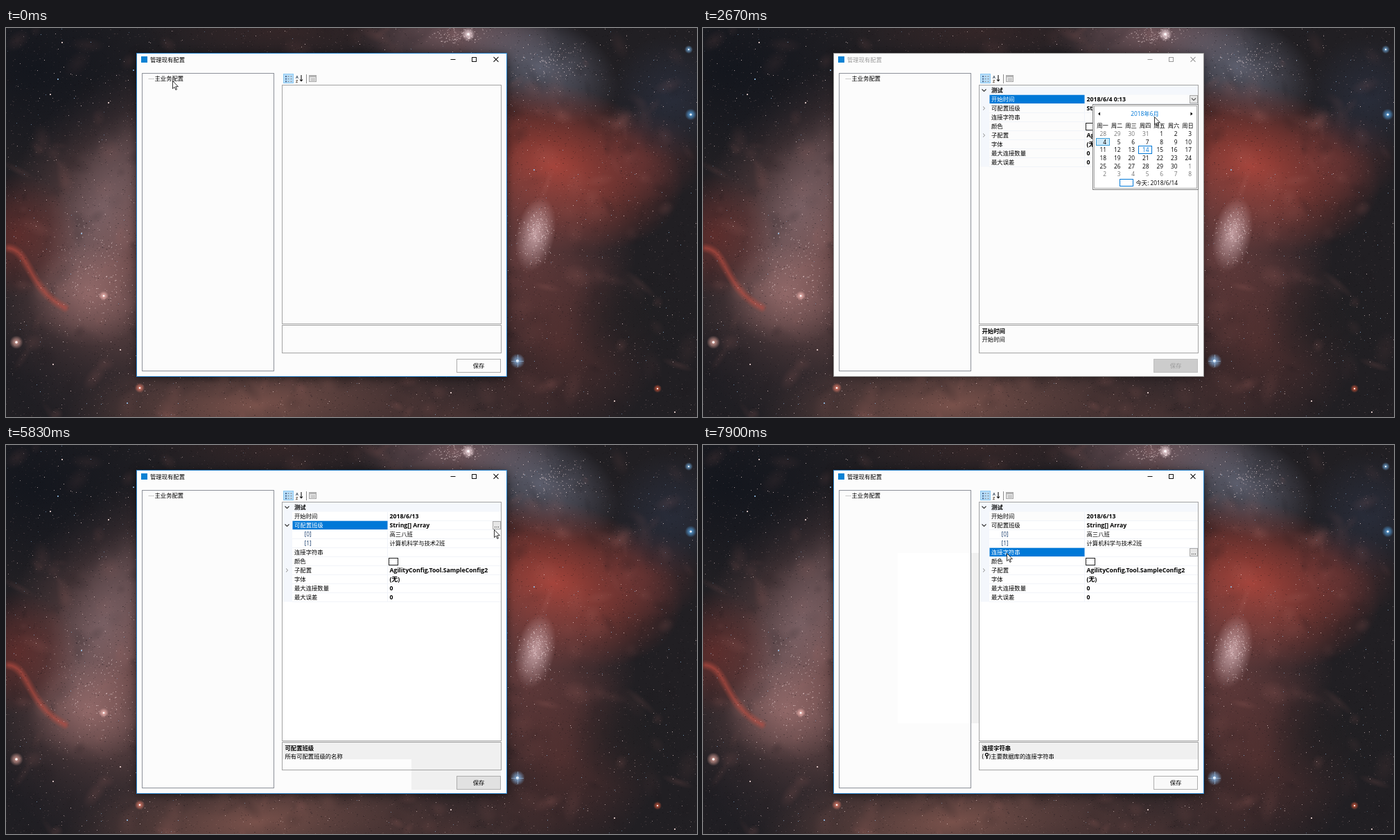
These frames come from a looping animation (997x562 px, 7990 ms). An HTML page with a canvas:

```html
<!DOCTYPE html>
<html>
<head>
<meta charset="utf-8">
<title>管理现有配置</title>
<style>
html, body { margin: 0; width: 100%; height: 100%; overflow: hidden; background: #1c1b20; }
canvas, svg { position: absolute; left: 0; top: 0; width: 997px; height: 562px; }
text { font: 8.33px "Open Sans", "Noto Sans CJK SC", "Noto Sans CJK", sans-serif; fill: #000; white-space: pre; }
.b { font-weight: 700; }
.v { font-size: 8.7px; font-weight: 700; }
.w { fill: #fff; }
.g { fill: #767676; }
.off { fill: #9b9b9b; }
.blue { fill: #0078d7; }
.navy { fill: #1c3f6e; }
.mid { text-anchor: middle; }
.end { text-anchor: end; }
.shadow { filter: drop-shadow(0 2px 6px rgba(0,0,0,.5)); }
.soft { filter: drop-shadow(0 1px 5px rgba(0,0,0,.3)); }
path { fill: none; }
</style>
</head>
<body>
<canvas id="sky" width="997" height="562"></canvas>
<svg id="ui" viewBox="0 0 997 562"></svg>
<script>
const LOOP = 7990;
// Moments at which the state of the interface changes, in ms
const LOAD = 270, PICK = 1140, DATE = 1860, CAL = 2670, SET = 3490,
      OPEN = 4570, EDIT = 6010, DONE = 6970, LINK = 7810;

/* ---------- nebula ---------- */
function paintSky() {
  const c = document.getElementById('sky').getContext('2d');
  let seed = 77;
  const rnd = () => (seed = (seed * 16807) % 2147483647) / 2147483647;
  c.fillStyle = '#211f23';
  c.fillRect(0, 0, 997, 562);

  const blob = (x, y, rx, ry, rgb, a, rot = 0) => {
    c.save();
    c.translate(x, y);
    c.rotate(rot);
    c.scale(rx, ry);
    const g = c.createRadialGradient(0, 0, 0, 0, 0, 1);
    g.addColorStop(0, `rgba(${rgb},${a})`);
    g.addColorStop(.5, `rgba(${rgb},${a * .55})`);
    g.addColorStop(1, `rgba(${rgb},0)`);
    c.fillStyle = g;
    c.fillRect(-1, -1, 2, 2);
    c.restore();
  };
  blob(170, 310, 190, 270, '150,100,98', .72, .35);
  blob(140, 260, 70, 150, '150,128,135', .45, .4);
  blob(120, 385, 90, 75, '195,140,138', .5);
  blob(15, 300, 90, 90, '120,48,44', .6);
  blob(360, 545, 280, 85, '150,98,88', .75, -.08);
  blob(640, 560, 190, 90, '110,70,66', .5);
  blob(650, 10, 150, 55, '150,112,118', .7);
  blob(400, 5, 200, 45, '80,48,46', .4);
  blob(770, 55, 120, 75, '125,128,148', .65, .4);
  blob(790, 200, 190, 120, '190,72,60', .85, .25);
  blob(740, 320, 170, 160, '145,80,78', .6);
  blob(764, 298, 28, 55, '235,200,205', .7, .2);
  blob(800, 455, 140, 150, '120,62,58', .5);
  blob(915, 190, 90, 70, '135,62,60', .45);
  blob(960, 100, 90, 90, '55,70,100', .35);
  blob(40, 60, 200, 140, '16,20,28', .8);
  blob(910, 420, 100, 80, '32,31,34', .8);
  blob(30, 510, 160, 90, '30,29,35', .6);

  for (let i = 0; i < 420; i++)
    blob(rnd() * 997, rnd() * 562, 6 + rnd() * 24, 5 + rnd() * 14,
      rnd() < .55 ? '24,20,24' : '178,110,104', .06 + rnd() * .12, rnd() * 3);

  c.lineCap = 'round';
  for (let i = 0; i < 5; i++) {
    c.strokeStyle = `rgba(190,80,68,${.24 - i * .035})`;
    c.lineWidth = 2 + i * 3;
    c.beginPath();
    c.moveTo(4, 318);
    c.bezierCurveTo(35, 322, 30, 375, 85, 404);
    c.stroke();
  }

  // Grain, then stars
  for (let i = 0; i < 15000; i++) {
    c.fillStyle = rnd() < .55 ? `rgba(15,12,16,${.1 + rnd() * .25})` : `rgba(225,180,176,${rnd() * .2})`;
    c.fillRect(rnd() * 997 | 0, rnd() * 562 | 0, 1 + rnd() * 1.4 | 0, 1);
  }
  for (let i = 0; i < 1000; i++) {
    const s = rnd();
    c.fillStyle = `rgba(${rnd() < .3 ? '150,195,235' : '250,225,222'},${.25 + s * .55})`;
    const d = s > .97 ? 2 : 1;
    c.fillRect(rnd() * 997 | 0, rnd() * 562 | 0, d, d);
  }
  const cluster = (x, y, w, h, n) => {
    for (let i = 0; i < n; i++) {
      c.fillStyle = `rgba(255,235,235,${.3 + rnd() * .6})`;
      c.fillRect(x + (rnd() + rnd() - 1) * w, y + (rnd() + rnd() - 1) * h, 1, 1);
    }
  };
  cluster(655, 11, 50, 14, 130);
  cluster(764, 300, 28, 48, 170);
  cluster(125, 350, 70, 110, 160);
  cluster(790, 50, 60, 32, 120);

  const star = (x, y, r, rgb) => {
    blob(x, y, r * 2.4, r * 2.4, rgb, .9);
    c.fillStyle = '#fff';
    c.beginPath();
    c.arc(x, y, r * .45, 0, 7);
    c.fill();
  };
  star(738, 481, 4.5, '140,190,240');
  star(988, 125, 3.5, '90,170,235');
  star(940, 521, 2.5, '220,90,60');
  star(15, 454, 4, '230,170,160');
  star(141, 387, 3, '250,190,185');
  star(667, 9, 4, '255,230,235');
  star(985, 31, 2.5, '120,180,230');
  star(193, 520, 3, '240,130,110');
  c.fillStyle = 'rgba(170,205,240,.7)';
  c.fillRect(729, 481, 18, .7);
  c.fillRect(738, 472, .7, 18);
}

/* ---------- svg helpers ---------- */
const on = (when, body) => `<g data-on="${when}">${body}</g>`;
const txt = (x, cy, s, cls = '') => `<text x="${x}" y="${cy + 3.2}" class="${cls}">${s}</text>`;
const box = (x, y, w, h, fill, stroke, cls = '') => stroke
  ? `<rect x="${x + .5}" y="${y + .5}" width="${w - 1}" height="${h - 1}" fill="${fill}" stroke="${stroke}" class="${cls}"/>`
  : `<rect x="${x}" y="${y}" width="${w}" height="${h}" fill="${fill}" class="${cls}"/>`;
const line = (d, color = '#000', w = 1) => `<path d="${d}" stroke="${color}" stroke-width="${w}"/>`;
const down = (x, y, c = '#333') => line(`M${x - 3} ${y - 1.5}l3 3 3-3`, c, 1.1);
const up = (x, y, c) => line(`M${x - 2.5} ${y + 1}l2.5-2.5 2.5 2.5`, c);
const right = (x, y, c = '#8a8a8a') => line(`M${x - 1.5} ${y - 2.5}l2.7 2.5-2.7 2.5`, c);
const left = (x, y, c) => line(`M${x + 1.5} ${y - 2.5}l-2.7 2.5 2.7 2.5`, c);
const cross = (x, y, c) => line(`M${x - 3.5} ${y - 3.5}l7 7m0-7l-7 7`, c, 1.1);
const button = (x, y, w, h, s, fill, edge, cls = '') =>
  box(x, y, w, h, fill, edge) + txt(x + w / 2, y + h / 2, s, 'mid ' + cls);

/* ---------- window ---------- */
const TREE = [197, 66, 189, 429], GRID = [399, 83, 315, 344];

// Freshly repainted area: grey face, white inside the tree and the grid
function patch(x, y, w, h) {
  const inner = ([a, b, c, d]) => {
    const l = Math.max(x, a), t = Math.max(y, b);
    const r = Math.min(x + w, a + c), e = Math.min(y + h, b + d);
    return r > l && e > t ? box(l, t, r - l, e - t, '#fff') : '';
  };
  return box(x, y, w, h, '#f0f0f0') + inner(TREE) + inner(GRID);
}

const caption = (c, edge, cls, shadow) =>
  box(188, 36, 535, 468, '#fcfcfc', edge, shadow) +
  txt(208, 45.5, '管理现有配置', cls) +
  line('M641.5 45.5h7', c) + box(672, 42, 7, 7, 'none', c) + cross(707, 45.3, c);

function frameLayer() {
  return on(`0-${CAL} ${SET}-${EDIT} ${DONE}-${LOOP}`, caption('#111', '#2a86cf', '', 'shadow')) +
    on(`${CAL}-${SET} ${EDIT}-${DONE}`, caption('#999', '#8f8f8f', 'off', 'soft')) +
    box(195, 41, 9, 9, '#0a82d4') +
    on(`${LOAD}-${CAL}`, patch(213, 66, 501, 432)) +
    on(`${SET}-${EDIT}`, patch(585, 180, 129, 318)) +
    on(`${OPEN}-${EDIT}`, patch(399, 96, 315, 358)) +
    on(`${DONE}-${LOOP}`, patch(281, 156, 117, 246)) +
    on(`${LINK}-${LOOP}`, patch(399, 109, 315, 345)) +
    box(196, 65, 191, 431, 'none', '#8d9199') +
    box(398, 82, 317, 346, 'none', '#a3a3a3') +
    box(398, 429, 317, 41, 'none', '#a3a3a3') +
    `<path d="M206 73.5h7" stroke="#999" stroke-dasharray="1 1"/>` +
    txt(214.5, 73, '主业务配置') +
    on(`${LOAD}-${PICK}`, box(213, 66, 44, 14, '#0078d7') + txt(214.5, 73, '主业务配置', 'w'));
}

function toolbar() {
  let dots = '';
  for (let i = 0; i < 3; i++)
    dots += box(403, 69 + i * 3.6, 2, 2, '#4a6a94') + box(406.5, 69.5 + i * 3.6, 2, 1, '#777') + box(410.5, 69.5 + i * 3.6, 2, 1, '#777');
  return box(400, 66, 15, 14, '#b9dffa', '#8cc8f2') + dots +
    '<text x="418" y="73" style="font-size:5.5px;font-weight:700;fill:#345">A</text>' +
    '<text x="418" y="78.5" style="font-size:5.5px;font-weight:700;fill:#543">Z</text>' +
    line('M426 68v8.5m-2-2l2 2.2 2-2.2', '#111', 1.1) + line('M433.5 67v13', '#8c8c8c') +
    box(437, 68, 11, 10, '#e2e2e2', '#a8a8a8') + box(438, 69, 9, 2, '#b5b5b5') +
    box(440, 73, 6, 1, '#b5b5b5') + box(440, 75, 6, 1, '#b5b5b5');
}

function rows(list) {
  const last = 90 + list.length * 13 + 6.5;
  let s = box(399, 83, 14, last - 83, '#f4f7fc') + box(413, 83, 301, 13.5, '#f4f7fc') +
    down(405.5, 90) + txt(416, 90, '测试', 'b');
  list.forEach(([name, value, mark], i) => {
    const y = 103 + i * 13, sub = name[0] == '[';
    s += line(`M413 ${y + 6.5}h301`, '#f1f4f9') + txt(sub ? 430.5 : 416, y, name, sub ? 'navy' : '') +
      txt(553.5, y, value, sub ? '' : 'v');
    if (mark == '>') s += right(405.5, y);
    if (mark == 'v') s += down(405.5, y);
    if (mark == '#') s += box(552, y - 5, 14, 11, '#fff', '#222');
  });
  return s + line(`M550.5 97V${last}`, '#f1f4f9');
}

const selected = (y, name, list) =>
  box(413.5, y - 6.3, 137, 12.3, '#0078d7') + txt(416, y, name, 'w') +
  box(702, y - 6, 12, 12, '#e6e6e6', '#a9a9a9') +
  (list ? down(708, y, '#555') : [705, 707.5, 710].map(x => box(x, y + 2, 1, 1, '#222')).join(''));

const about = (name, text) => txt(402.5, 437.5, name, 'b') + txt(402.5, 450, text);

function gridLayer() {
  const span = '可配置班级', type = 'String[] Array';
  const tail = [['连接字符串', ''], ['颜色', '', '#'], ['子配置', 'AgilityConfig.Tool.SampleConfig2', '>'],
    ['字体', '(无)'], ['最大连接数量', '0'], ['最大误差', '0']];
  const key = '<circle cx="409.5" cy="447.3" r="2" fill="none" stroke="#000" stroke-width="1.3"/>' +
    line('M409.5 449v4.5m0-1.5h1.6', '#000', 1.2);
  const array = about(span, '所有可配置班级的名称');
  return on(`${LOAD}-${OPEN}`, rows([['开始时间', ''], [span, type, '>'], ...tail])) +
    on(`${LOAD}-${PICK}`, box(413, 97, 137, 12, '#f4f7fc') + txt(416, 103, '开始时间')) +
    on(`${OPEN}-${LOOP}`, rows([['开始时间', ''], [span, type, 'v'], ['[0]', '高三八班'], ['[1]', '计算机科学与技术2班'], ...tail])) +
    on(`${LOAD}-${SET}`, txt(553.5, 103, '2018/6/4 0:13', 'v')) +
    on(`${SET}-${LOOP}`, txt(553.5, 103, '2018/6/13', 'v')) +
    on(`${PICK}-${DATE} ${OPEN}-${EDIT}`, selected(116, span)) +
    on(`${DATE}-${OPEN}`, selected(103, '开始时间', true)) +
    on(`${LINK}-${LOOP}`, selected(155, '连接字符串')) +
    on(`${LOAD}-${PICK} ${DATE}-${OPEN}`, about('开始时间', '开始时间')) +
    on(`${PICK}-${DATE} ${OPEN}-${LINK}`, array) +
    on(`${LINK}-${LOOP}`, about('连接字符串', '(') + key + txt(412.5, 450, ')') + txt(415.3, 450, '主要数据库的连接字符串'));
}

function saveButton() {
  const b = (...a) => button(650, 478, 64, 20, '保存', ...a);
  return on(`0-${LOAD}`, b('#fcfcfc', '#adadad')) + on(`${LOAD}-${SET}`, b('#cccccc', '#bfbfbf', 'off')) +
    on(`${SET}-${EDIT}`, b('#e1e1e1', '#adadad')) + on(`${EDIT}-${LOOP}`, b('#f9f9f9', '#adadad'));
}

function calendar() {
  let s = box(562, 110, 153, 124, '#fff', '#7d7d7d') + box(564, 112, 149, 120, '#fff', '#a9a9a9') +
    '<path d="M573 121.5v5l-3-2.5zM703.500 121.500v5l3-2.500z" style="fill:#000"/>' +
    txt(637.5, 124, '2018年6月', 'mid blue') +
    box(567, 159, 20, 11, '#cfeafa', '#3f9fd8') + box(628, 170, 20, 12, '#fff', '#0078d7');
  [...'一二三四五六日'].forEach((d, i) => s += txt(576.5 + i * 20.5, 140.5, '周' + d, 'mid'));
  for (let i = 0; i < 42; i++) {
    const n = i - 3, day = n < 1 ? n + 31 : n > 30 ? n - 30 : n;
    const cls = n < 1 || n > 30 ? 'g' : n == 14 ? 'blue' : '';
    s += txt(582 + (i % 7) * 20.5, 153 + (i / 7 | 0) * 11.6, day, 'end ' + cls);
  }
  return s + box(601, 218, 20, 11, '#fff', '#0078d7') + txt(624.5, 223.5, '今天: 2018/6/14');
}

function dialog() {
  let grip = '';
  for (let i = 0; i < 3; i++)
    for (let j = 0; j <= i; j++) grip += box(604 - j * 2, 388 + i * 2, 1, 1, '#a8a8a8');
  const c = '#9a9a9a';
  return box(281, 196, 326, 199, '#f0f0f0', '#3a92d4', 'soft') + box(282, 197, 324, 21, '#fff') +
    txt(287, 207, '字符串集合编辑器') + txt(559.5, 206.5, '?', 'mid b') + cross(590.3, 206.5, '#222') +
    txt(290.5, 227, '在集合中输入字符串(每行一个)(E):') +
    box(290, 235, 308, 135, '#fff', '#5f9fce') +
    box(586, 236, 11, 133, '#f0f0f0') + box(291, 358, 306, 11, '#f0f0f0') +
    up(591, 243, c) + line('M588.500 350.500l2.500 2.500 2.500-2.500', c) + left(297, 363, c) + right(579.5, 363, c) +
    box(291, 237, 34, 8.5, '#0078d7') + box(291, 245.500, 80, 8.500, '#0078d7') +
    txt(291.5, 241.5, '高三八班', 'w') + txt(291.5, 250, '计算机科学与技术2班', 'w') +
    button(492, 374, 50, 14, '确定', '#e1e1e1', '#adadad') +
    button(547, 374, 50, 14, '取消', '#e1e1e1', '#adadad') + grip;
}

const pointer = '<g id="pointer"><path d="M0 0V11.200L2.600 8.800 4.400 12.900 6 12.200 4.300 8.200H7.900Z" ' +
  'style="fill:#fff" stroke="#000" stroke-width=".8" stroke-linejoin="round"/></g>';

paintSky();
document.getElementById('ui').innerHTML = frameLayer() + toolbar() + gridLayer() + saveButton() +
  on(`${CAL}-${SET}`, calendar()) + on(`${EDIT}-${DONE}`, dialog()) + pointer;

/* ---------- playback ---------- */
const parts = [...document.querySelectorAll('[data-on]')].map(el => ({
  el, spans: el.dataset.on.split(' ').map(s => s.split('-').map(Number))
}));
const hand = document.getElementById('pointer');
const path = [
  [0, 240, 76], [300, 241, 77], [1050, 489, 113], [1410, 489, 114], [1860, 520, 104],
  [2490, 708, 102], [2580, 708, 102], [2670, 651, 128], [3120, 616, 176], [3490, 616, 176],
  [4300, 414, 120], [4480, 406, 118], [4660, 406, 118], [5470, 673, 131], [5830, 704, 122],
  [6010, 704, 122], [6520, 495, 192], [6790, 516, 379], [6970, 516, 379], [7630, 440, 159],
  [7810, 438, 156], [LOOP, 438, 156]
];
const ticks = [0, 960, 3490, 6520, 7630];

// The screen was sampled every 90 ms
function sample(t) {
  const base = ticks.filter(k => k <= t).pop();
  return base + Math.floor((t - base) / 90) * 90;
}

function place(t) {
  const i = path.findIndex(k => k[0] > t);
  const [t0, x0, y0] = path[i - 1], [t1, x1, y1] = path[i];
  const u = (t - t0) / (t1 - t0), e = u * u * (3 - 2 * u);
  hand.setAttribute('transform', `translate(${x0 + (x1 - x0) * e + .5} ${y0 + (y1 - y0) * e + .5})`);
}

const start = performance.now();
function draw() {
  const t = (performance.now() - start) % LOOP;
  for (const { el, spans } of parts)
    el.style.display = spans.some(([a, b]) => t >= a && t < b) ? '' : 'none';
  place(sample(t));
  requestAnimationFrame(draw);
}
draw();
</script>
</body>
</html>
```
